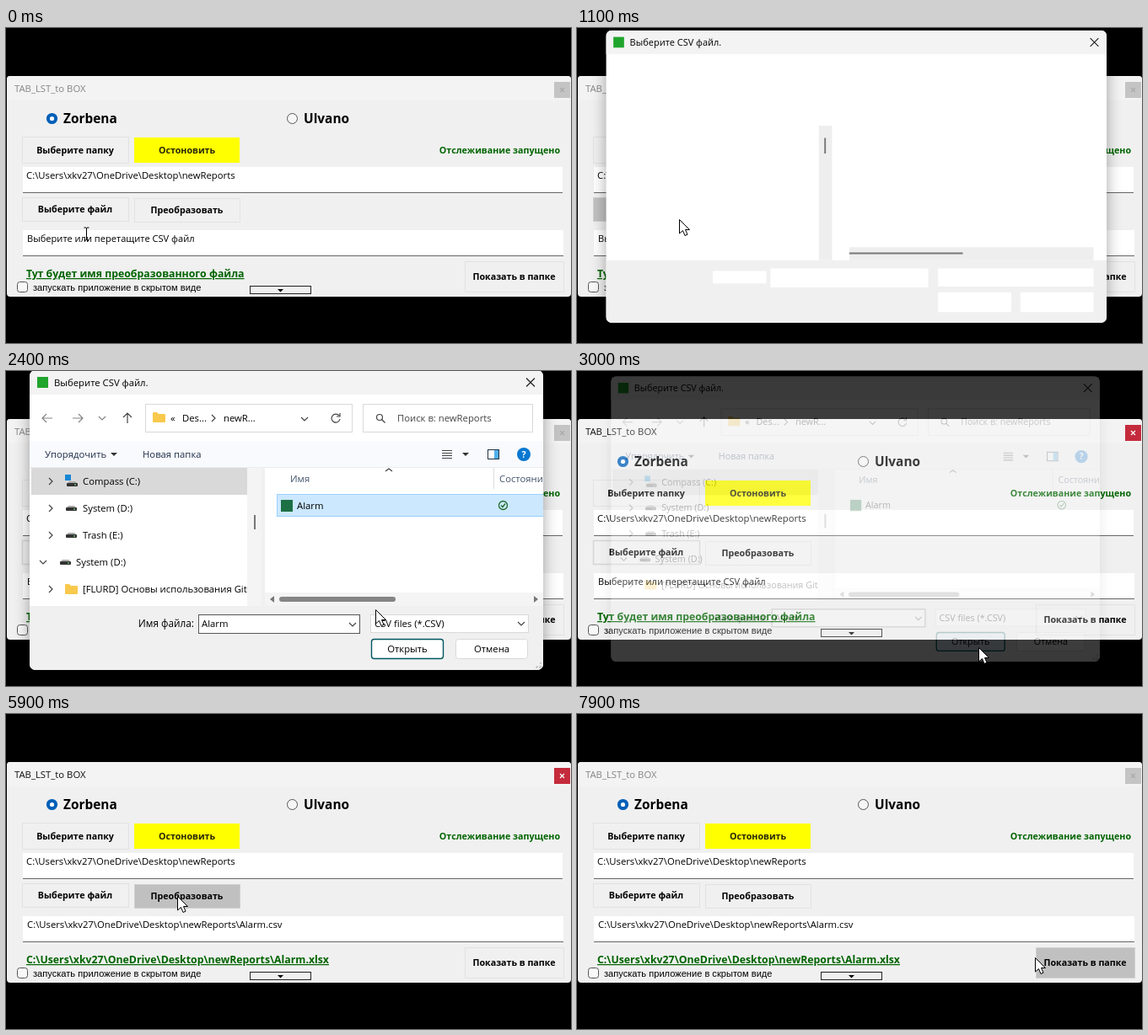
Recreate the animation shown at these times as an HTML page. Size 670x374 px, loop 8 s.

```html
<!DOCTYPE html>
<html lang="ru">
<head>
<meta charset="utf-8">
<style>
html, body { margin: 0; width: 100%; height: 100%; overflow: hidden; background: #000 }
svg { display: block; width: 670px; height: 374px; font: 11.3px "Open Sans", "Noto Sans", sans-serif }
.bold { font-weight: 700; font-size: 10.7px }
.mid { text-anchor: middle }
.maker { font-weight: 700; font-size: 15.4px }
.link { font-weight: 700; font-size: 12.3px; text-decoration: underline }
.green { fill: #006400 }
.small { font: 11.1px "Liberation Sans", Arial, sans-serif }
.ru { font-size: 11.1px }
.label { font-size: 11.8px }
.btn { fill: #f0f0f0; stroke: #e2e2e2 }
.btn.hover { fill: #c0c0c0; stroke: #d0d0d0 }
.btn.focus { stroke: #d6d6d6; stroke-width: 1.6 }
.box { fill: #fff; stroke: #d9d9d9 }
.line { fill: none; stroke: #444; stroke-width: 1.2 }
.grey { stroke: #858585 }
.head { fill: #43546b }
.tool { fill: #1f2f4a }
#dialog { filter: drop-shadow(0 3px 9px rgba(0, 0, 0, .35)) }
</style>
</head>
<body>
<svg viewBox="0 0 670 374">
  <defs>
    <path id="chevron" class="line" d="M-2 -4 2 0 -2 4"/>
    <g id="drive"><rect y="-1" width="13" height="4" rx="1" fill="#333"/><path d="M1 -1 3 -3H10L12 -1" fill="#aaa"/><path d="M9 1h2" stroke="#8f8"/></g>
    <path id="folder" d="M0 -5q0 -1 1 -1h4l2 2h7q1 0 1 1v8q0 1 -1 1H1q-1 0 -1 -1z" fill="#f8c94c"/>
    <clipPath id="frame"><rect x="28" y="-1" width="609" height="356" rx="7"/></clipPath>
  </defs>

  <g id="main">
    <rect x="1" y="57" width="669" height="262" rx="4" fill="#f0f0f0"/>
    <path d="M1 86V61q0-4 4-4H666q4 0 4 4V86z" fill="#f3f3f3"/>
    <text id="caption" x="10" y="76">TAB_LST_to BOX</text>
    <rect id="close" x="650" y="64" width="19" height="19"/>
    <path id="cross" d="M657 71l5 5m0-5l-5 5" stroke-width="1.2"/>

    <circle cx="54.5" cy="107.5" r="4.6" fill="#fff" stroke="#005fb8" stroke-width="4"/>
    <circle cx="339.5" cy="107.5" r="6" fill="#f6f6f6" stroke="#555"/>
    <text class="maker" x="68" y="113">Zorbena</text>
    <text class="maker" x="353" y="113">Ulvano</text>

    <rect class="btn" x="19.5" y="129.5" width="126" height="31"/>
    <text class="bold mid" x="82" y="149">Выберите папку</text>
    <rect x="152" y="130" width="125" height="30" fill="#ff0"/>
    <text class="bold mid" x="214.5" y="149" fill="#26260a">Остоновить</text>
    <text class="bold green" x="657" y="149" text-anchor="end">Отслеживание запущено</text>

    <path d="M20 165H660V195H20z" fill="#fff"/><path d="M20 195.5H660" stroke="#666"/>
    <text x="24" y="179">C:\Users\xkv27\OneDrive\Desktop\newReports</text>

    <rect id="pick" class="btn" x="19.5" y="201.5" width="126" height="28"/>
    <text class="bold mid" x="82" y="219">Выберите файл</text>
    <rect id="convert" class="btn" x="152.5" y="202.5" width="125" height="28"/>
    <text class="bold mid" x="214.5" y="220">Преобразовать</text>

    <path d="M20 240H661V270H20z" fill="#fff"/><path d="M20 270.5H661" stroke="#666"/>
    <text id="input" x="25" y="254"></text>

    <text id="output" class="link green" x="24" y="296"></text>
    <rect x="13.5" y="301.5" width="12" height="12" rx="3" fill="#f8f8f8" stroke="#555"/>
    <text class="small" x="32" y="312">запускать приложение в скрытом виде</text>
    <rect x="289.5" y="306.5" width="72" height="9" fill="#f0f0f0" stroke="#222"/>
    <path d="M322 310h7l-3.5 3.5z"/>
    <rect id="show" class="btn" x="544.5" y="277.5" width="117" height="36"/>
    <text class="bold mid" x="602.5" y="299">Показать в папке</text>
  </g>

  <g id="dialog"><g clip-path="url(#frame)">
    <rect x="28" y="-1" width="609" height="356" fill="#fff"/>
    <rect x="28" y="-1" width="609" height="29" fill="#f3f3f3"/>
    <rect x="28" y="279" width="609" height="76" fill="#f0f0f0"/>
    <rect x="37" y="7" width="13" height="13" fill="#20a52c"/>
    <text x="57" y="18">Выберите CSV файл.</text>
    <path d="M617 8.500l10 10m0-10l-10 10" stroke="#222" stroke-width="1.2"/>

    <g id="skeleton">
      <path d="M287 115h16V279h-16zM324 263H621v16H324z" fill="#eee"/>
      <path d="M294.500 130v19M324 270.500H462" stroke="#777" stroke-width="2"/>
      <path d="M158 292h65v15h-65zM228 289H420v23H228zM432 289H621v22H432zM432 318h89v24h-89zM532 318h89v24h-89z" fill="#fff"/>
    </g>

    <g id="content">
      <path class="line grey" d="M55 56H43m5-5-5 5 5 5M79 56H91m-5-5 5 5-5 5M110 54l4 4 4-4"/>
      <path class="line" d="M144 62V50m-5 5 5-5 5 5"/>
      <rect class="box" x="165.500" y="39.500" width="245" height="33"/>
      <use href="#folder" x="174" y="55"/>
      <text x="195" y="60">«</text>
      <text x="209" y="60">Des...</text>
      <use href="#chevron" x="246" y="56"/>
      <text x="258" y="60">newR...</text>
      <path class="line" d="M350 55l4 4 4-4M395 53a5 5 0 1 0 1 4M396 50v4h-4"/>
      <rect class="box" x="423.500" y="39.500" width="201" height="33"/>
      <circle class="line" cx="443" cy="55" r="3.500"/><path class="line" d="M445.500 57.500l4 4"/>
      <text x="464" y="60" fill="#444">Поиск в: newReports</text>

      <rect x="28" y="83" width="609" height="31" fill="#f9fafd"/>
      <text class="tool" x="46" y="103">Упорядочить</text>
      <path d="M124 97h8l-4 4zM541 97h8l-4 4z" fill="#333"/>
      <text class="tool" x="162" y="103">Новая папка</text>
      <path class="line" d="M517 94.500h12m-12 3h12m-12 3h12m-12 3h12"/>
      <rect x="571.500" y="93.500" width="13" height="11" fill="#fff" stroke="#234"/><path d="M579 94h5v10h-5z" fill="#4fb0ea"/>
      <circle cx="614" cy="99" r="8" fill="#0878d1"/><text class="bold mid" x="614" y="103" fill="#fff">?</text>
      <path d="M28 114.500H637" stroke="#ececec"/>

      <rect x="30" y="115" width="256" height="32" fill="#d9d9d9"/>
      <use href="#chevron" x="53" y="131"/><rect x="70" y="123" width="7" height="7" fill="#1787d4"/><use href="#drive" x="72" y="134"/>
      <text x="91" y="135">Compass (C:)</text>
      <use href="#chevron" x="53" y="163"/><use href="#drive" x="71" y="163"/>
      <text x="91" y="167">System (D:)</text>
      <use href="#chevron" x="53" y="195"/><use href="#drive" x="71" y="195"/>
      <text x="91" y="199">Trash (E:)</text>
      <path class="line" d="M40 225l4 4 4-4" stroke-width="1.6"/><use href="#drive" x="64" y="227"/>
      <text x="83" y="231">System (D:)</text>
      <use href="#chevron" x="53" y="259"/><use href="#folder" x="70" y="259"/>
      <text x="91" y="263">[FLURD] Основы использования Git</text>
      <path d="M286 115h17V279h-17z" fill="#f4f4f4"/><path d="M295 171v17" stroke="#777" stroke-width="2"/>
      <path d="M303 115h4V279h-4z" fill="#f0f0f0"/>

      <path class="line" d="M450 119l4-3 4 3"/>
      <text class="head" x="337" y="132">Имя</text>
      <path d="M578.500 115v25" stroke="#ddd"/>
      <text class="head" x="585" y="132">Состояние</text>
      <rect id="row" x="321.500" y="146.500" width="320" height="26" fill="#cce8ff" stroke="#99d1ff"/>
      <rect x="326" y="153" width="14" height="14" fill="#1d7044"/>
      <text x="345" y="164">Alarm</text>
      <path d="M584.500 159.500a5 5 0 1 0 10 0a5 5 0 1 0 -10 0M587 159.500l2 2 3-4" fill="none" stroke="#1d6a2c" stroke-width="1.3"/>
      <path d="M307 263H637v16H307z" fill="#f4f4f4"/>
      <rect x="324" y="268" width="138" height="6" rx="3" fill="#858585"/>
      <path d="M318 267v8l-5-4zM626 267v8l5-4z" fill="#777"/>

      <text class="label" x="223" y="304" text-anchor="end">Имя файла:</text>
      <rect x="228.500" y="289.500" width="191" height="22" fill="#fff" stroke="#555"/>
      <text id="filename" x="232" y="304">Alarm</text>
      <rect class="box" x="432.500" y="289.500" width="187" height="21"/>
      <text x="437" y="304">CSV files (*.CSV)</text>
      <path class="line" d="M407 299l4 4 4-4M607 298l4 4 4-4"/>
      <rect id="open" x="433.500" y="318.500" width="85" height="23" rx="3" fill="#fff" stroke="#00565f" stroke-width="1.4"/>
      <text class="mid" x="476" y="334">Открыть</text>
      <rect class="box" x="533.500" y="318.500" width="85" height="23" rx="3"/>
      <text class="mid" x="576" y="334">Отмена</text>
      <path d="M634 346v6m-4-2v2m4 0h-8" stroke="#aaa" stroke-dasharray="2"/>
    </g>
  </g></g>

  <g id="cursor">
    <path id="arrow" d="M0 0V16.500L4 13 6.500 19 9.500 17.700 7 12H12z" fill="#fff" stroke="#000"/>
    <path id="beam" d="M-3 -7.500h2.500l.5 .5 .5-.5H3M0 -7V7M-3 7.500h2.500l.5-.5 .5 .5H3" fill="none" stroke="#000"/>
  </g>
</svg>
<script>
const LOOP = 8000, STEP = 100;
const $ = id => document.getElementById(id);
const folder = 'C:\\Users\\xkv27\\OneDrive\\Desktop\\newReports\\';

// time, x, y of the pointer tip
const route = [
  [100, 95, 244], [600, 121, 227], [1300, 121, 227], [1900, 400, 160],
  [2050, 400, 160], [2400, 438, 283], [2700, 476, 328], [3700, 476, 328],
  [4600, 290, 240], [5200, 203, 216], [6350, 203, 216], [7500, 543, 289]
];

const between = (t, from, to) => t >= from && t < to;
const show = (id, on) => $(id).setAttribute('visibility', on ? 'inherit' : 'hidden');
const set = (id, name, value) => $(id).setAttribute(name, value);

function setText(id, text) {
  if ($(id).textContent !== text) $(id).textContent = text;
}

function pointer(t) {
  const next = route.findIndex(p => p[0] > t);
  if (next === 0) return route[0].slice(1);
  if (next < 0) return route.at(-1).slice(1);
  const [t0, x0, y0] = route[next - 1], [t1, x1, y1] = route[next];
  const u = (t - t0) / (t1 - t0), k = u * u * (3 - 2 * u);
  return [x0 + (x1 - x0) * k, y0 + (y1 - y0) * k];
}

function drawMain(t) {
  const active = between(t, 200, 1000) || between(t, 2900, 7700);
  set('caption', 'fill', active ? '#111' : '#858585');
  set('close', 'fill', active ? '#c42b3c' : '#c4c4c4');
  set('cross', 'stroke', active ? '#fff' : '#aaa');
  const picking = between(t, 400, 2000);
  set('pick', 'class', 'btn' + (picking ? ' hover' : between(t, 2000, 5500) ? ' focus' : ''));
  set('convert', 'class', 'btn' + (between(t, 5100, 6600) ? ' hover' : ''));
  set('show', 'class', 'btn' + (t >= 7300 ? ' hover' : ''));
  const chosen = t >= 3200;
  setText('input', chosen ? folder + 'Alarm.csv' : 'Выберите или перетащите CSV файл');
  set('input', 'class', chosen ? '' : 'ru');
  setText('output', t >= 5700 ? folder + 'Alarm.xlsx' : 'Тут будет имя преобразованного файла');
}

function drawDialog(t) {
  show('dialog', between(t, 1000, 3100));
  let scale = 1, opacity = 1;
  if (t < 1200) {
    scale = t < 1100 ? .95 : .975;
    opacity = t < 1100 ? .5 : 1;
  } else if (t >= 2900) {
    scale = t < 3000 ? .975 : .952;
    opacity = t < 3000 ? .6 : .24;
  }
  const drift = (1 - scale) * 50;
  set('dialog', 'transform', `translate(${332.5 - drift} ${177 - drift / 2}) scale(${scale}) translate(-332.5 -177)`);
  set('dialog', 'opacity', opacity);
  const loaded = t >= 1300;
  show('skeleton', !loaded);
  show('content', loaded);
  show('row', loaded && between(t, 1900, 2900));
  show('filename', loaded && t >= 1900);
  set('open', 'fill', t >= 2700 ? '#e0eef9' : '#fff');
}

function draw(t) {
  drawMain(t);
  drawDialog(t);
  const [x, y] = pointer(t);
  set('cursor', 'transform', `translate(${Math.round(x) + .5} ${Math.round(y) + .5})`);
  show('beam', t < 300);
  show('arrow', t >= 300);
}

const start = performance.now();
function tick() {
  const t = (performance.now() - start) % LOOP;
  draw(Math.floor(t / STEP) * STEP);
  requestAnimationFrame(tick);
}
tick();
</script>
</body>
</html>
```
